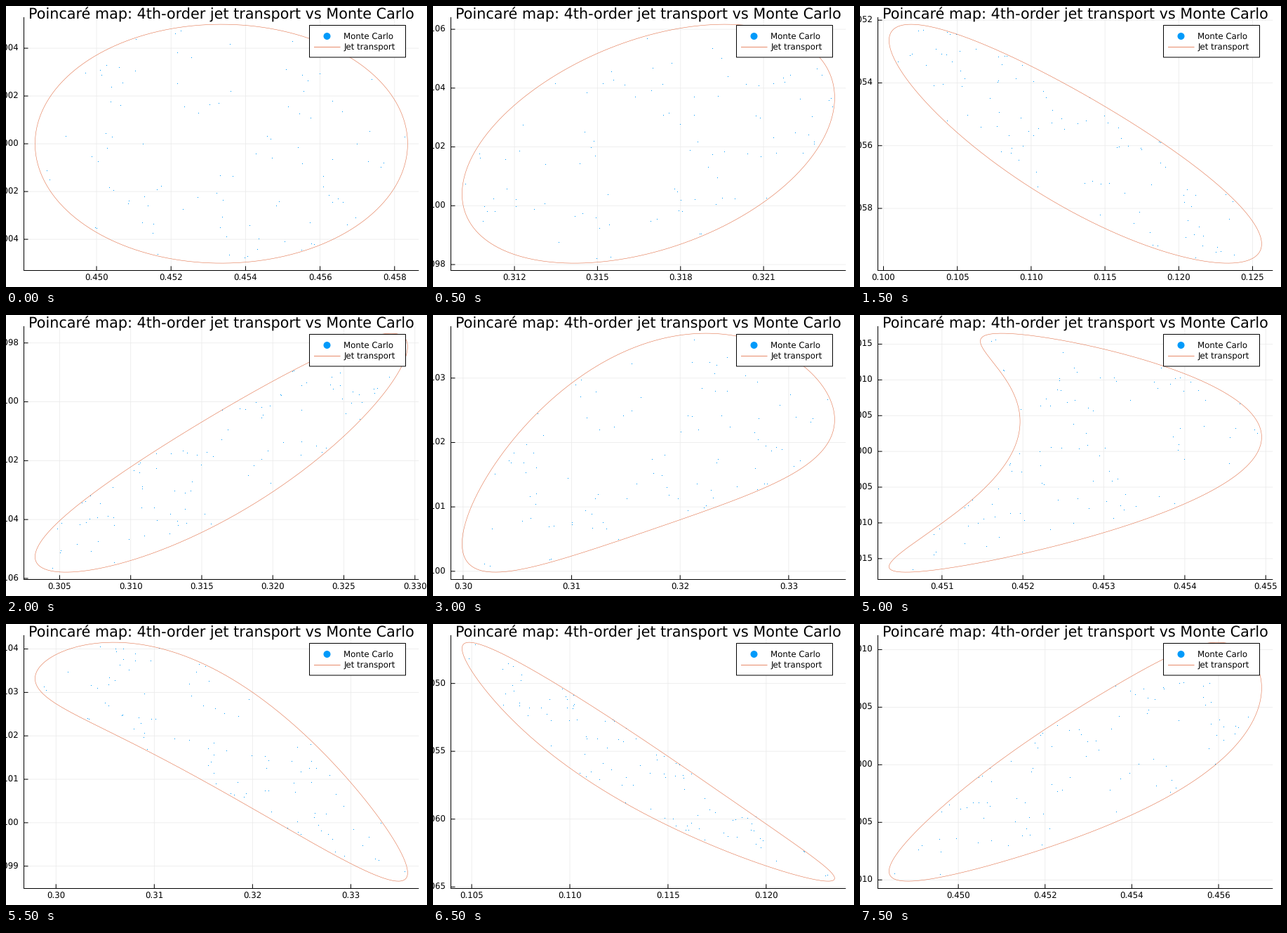
A matplotlib script that plays this animation: 600x400 px, repeating every 8000 ms.

```python
import math

import numpy as np
import matplotlib.pyplot as plt
from matplotlib.animation import FuncAnimation
from matplotlib.patches import Circle, Rectangle

W, H, DPI = 600, 400, 100
FRAMES, INTERVAL = 16, 500
L, R, T, B = 25.5, 588.3, 15.9, 376.3      # plot box in pixels
PT = 72 / DPI
BLUE, ORANGE, GRID = "#009AFA", "#E26F46", "#EBEBEB"

# Henon-Heiles system: energy, start point on the section x = 0, cloud radius
E0, Y0, RADIUS = 0.1025, 0.45335, 0.005
POINTS = 100


def field(s):
    x, y, px, py = s
    return np.array([px, py, -x * (1 + 2 * y), y * y - y - x * x])


def flow(s, time, steps):
    h = time / steps
    for _ in range(steps):
        k1 = field(s)
        k2 = field(s + h / 2 * k1)
        k3 = field(s + h / 2 * k2)
        k4 = field(s + h * k3)
        s = s + h / 6 * (k1 + 2 * k2 + 2 * k3 + k4)
    return s


def next_crossing(s):
    """Next passage through x = 0 with px > 0, refined by Newton steps."""
    s = flow(s, 6.4, 320)
    for _ in range(7):
        s = flow(s, -s[0] / s[2], 8)
    return s


def start(u, v):
    """States on the section for offsets given in units of RADIUS."""
    y, py = Y0 + RADIUS * u, RADIUS * v
    px = np.sqrt(2 * E0 - y**2 + 2 * y**3 / 3 - py**2)
    return np.array([0 * y, y, px, py])


def polar(r, a):
    return r * np.cos(a), r * np.sin(a)


def powers(u, v, order):
    return np.array([u**(n - j) * v**j
                     for n in range(order + 1) for j in range(n + 1)]).T


def simulate():
    """Cloud and 4th-order boundary curve at every iterate."""
    rng = np.random.default_rng(4)
    cloud = polar(np.sqrt(rng.random(POINTS)), 2 * math.pi * rng.random(POINTS))

    # small rings around the centre determine the jet
    scale = 0.36
    r, a = np.meshgrid(np.linspace(0, 1, 5), np.arange(16) * math.pi / 8)
    rings = polar(r.ravel(), a.ravel())
    fit = powers(*rings, 6)
    edge = powers(*polar(1 / scale, np.linspace(0, 2 * math.pi, 500)), 4)

    s = start(*(np.append(c, scale * g) for c, g in zip(cloud, rings)))
    views = []
    for i in range(FRAMES):
        if i:
            s = next_crossing(s)
        q = s[[1, 3]].T
        coef = np.linalg.lstsq(fit, q[POINTS:], rcond=None)[0]
        views.append((q[:POINTS], edge @ coef[:edge.shape[1]]))
    return views


def nice_ticks(lo, hi):
    """Pick 4 to 8 ticks by count, coverage, roundness and presence of zero."""
    best, found = -1, ([], 0)
    for e in range(-5, 0):
        for q, nice in ((1, 1), (5, .9), (2, .7), (2.5, .5), (3, .2)):
            step = q * 10.0**e
            first, last = math.ceil(lo / step), math.floor(hi / step)
            n = last - first + 1
            if not 4 <= n <= 8:
                continue
            score = ((1 - abs(n - 5) / 5) / 4 + (first <= 0 <= last) / 6
                     + 0.5 * (hi - lo) / ((n - 1) * step) + nice / 4)
            if score > best:
                best = score
                found = ([k * step for k in range(first, last + 1)],
                         -e + (q == 2.5))
    return found


def limits(*parts):
    v = np.concatenate(parts)
    pad = 0.03 * (v.max() - v.min())
    return v.min() - pad, v.max() + pad


def to_px(v, lim, a, b):
    return a + (v - lim[0]) / (lim[1] - lim[0]) * (b - a)


plt.rcParams["text.hinting"] = "none"
fig = plt.figure(figsize=(W / DPI, H / DPI), dpi=DPI, facecolor="white")
ax = fig.add_axes([0, 0, 1, 1])
ax.set_xlim(0, W)
ax.set_ylim(H, 0)
ax.axis("off")


def line(x, y, color="black", width=1.0, z=4):
    return ax.plot(x, y, color=color, lw=width * PT, zorder=z, snap=False,
                   solid_capstyle="butt")[0]


def label(x, y, text, size=11.8, ha="left", z=5):
    return ax.text(x, y, text, fontsize=size * PT, ha=ha, va="baseline",
                   family="DejaVu Sans", color="black", zorder=z)


label(306.5, 18.8, "Poincaré map: 4th-order jet transport vs Monte Carlo",
      20.72, "center")
line([L, L], [T, B + 0.7])
line([L - 0.5, R], [376.5, 376.5])

ax.add_patch(Rectangle((432.5, 27.5), 137, 45.5, fc="white", ec="black",
                       lw=PT, snap=False, zorder=6))
ax.add_patch(Circle((457.5, 43), 5, fc=BLUE, ec="none", zorder=7))
line([439, 476.5], [58.4, 58.4], ORANGE, 0.8, 7)
label(481, 47.2, "Monte Carlo", z=7)
label(482, 62.3, "Jet transport", z=7)

VIEWS = simulate()
live = []


def draw(i):
    while live:
        live.pop().remove()
    dots, curve = VIEWS[i]
    xlim = limits(dots[:, 0], curve[:, 0])
    ylim = limits(dots[:, 1], curve[:, 1])

    ticks, digits = nice_ticks(*xlim)
    for t in ticks:
        x = to_px(t, xlim, L, R)
        live.append(line([x, x], [T, B], GRID, 0.8, 1))
        live.append(line([x, x], [B, B - 6]))
        live.append(label(x, 391.2, f"{t:.{digits}f}", ha="center"))

    ticks, digits = nice_ticks(*ylim)
    for t in ticks:
        y = to_px(t, ylim, B, T)
        live.append(line([L, R], [y, y], GRID, 0.8, 1))
        live.append(line([L, L + 6], [y, y]))
        live.append(label(17.9, y + 3.7, f"{t:.{digits}f}", ha="right"))

    live.extend(ax.plot(to_px(dots[:, 0], xlim, L, R),
                        to_px(dots[:, 1], ylim, B, T),
                        ",", color=BLUE, zorder=2))
    live.append(line(to_px(curve[:, 0], xlim, L, R),
                     to_px(curve[:, 1], ylim, B, T), ORANGE, 0.55, 3))
    return live


anim = FuncAnimation(fig, draw, frames=FRAMES, interval=INTERVAL,
                     init_func=lambda: [], repeat=True, repeat_delay=0,
                     blit=False)
plt.show()
```
